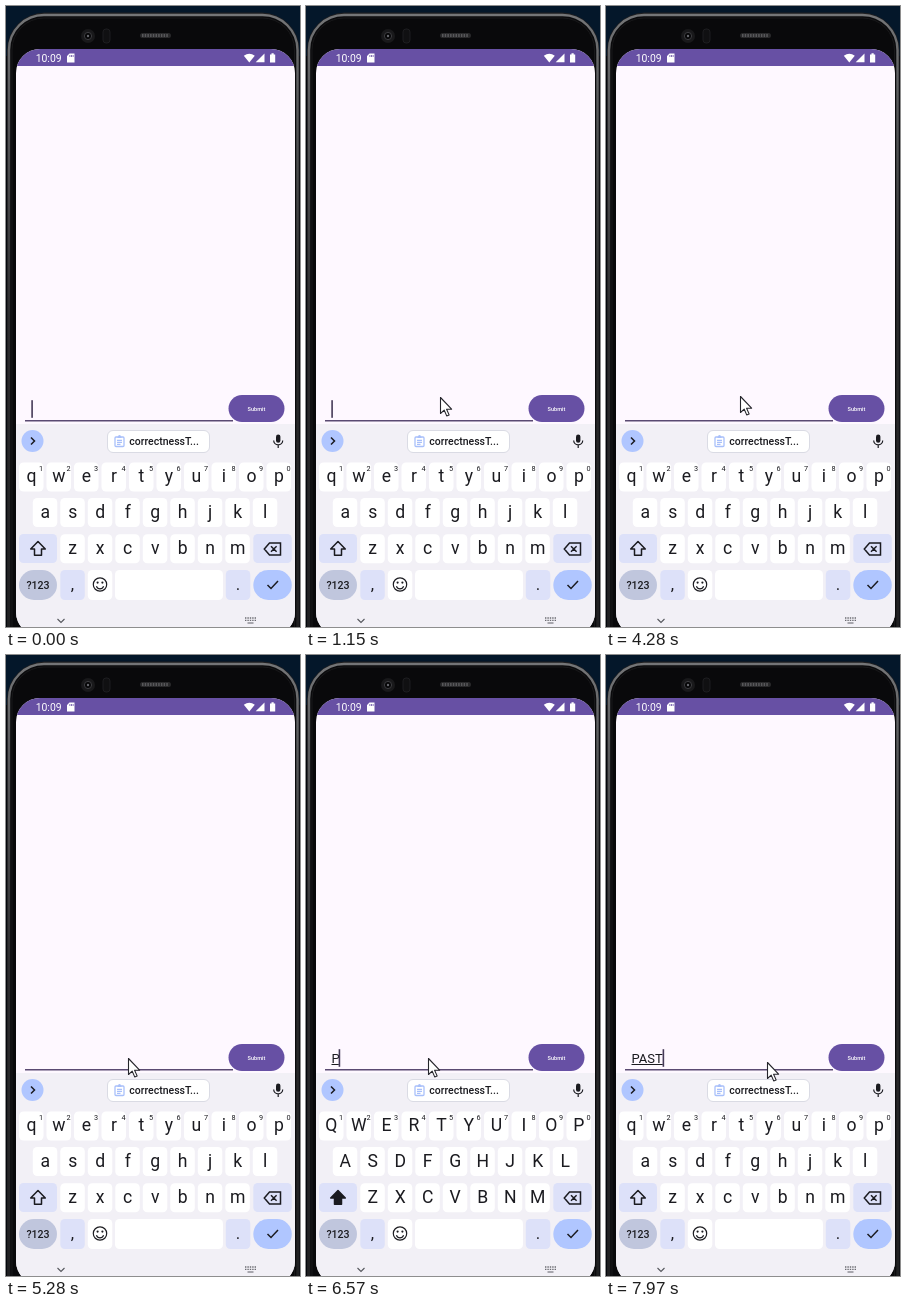
Animation, 294 px wide and 621 px high, one loop 8000 ms. Source, as an HTML page:

```html
<!DOCTYPE html>
<html lang="en">
<head>
<meta charset="utf-8">
<style>
  html, body { margin: 0; width: 100%; height: 100%; overflow: hidden; background: #04070c; }
  svg { display: block; width: 100%; height: 100%; }
  text { font-family: Roboto, sans-serif; fill: #1b1b20; }
  .mid { text-anchor: middle; }
  .line { fill: none; stroke: #1b1b20; stroke-width: 1.5; }
  .thin { stroke-width: 1.2; }
</style>
</head>
<body>
<svg id="stage" viewBox="0 0 294 621" preserveAspectRatio="none">
  <defs>
    <linearGradient id="rim" gradientUnits="userSpaceOnUse" x1="0" y1="0" x2="0" y2="621">
      <stop stop-color="#77787a"/><stop offset=".15" stop-color="#5a5b5d"/><stop offset=".5" stop-color="#2c2c2e"/><stop offset="1" stop-color="#202022"/>
    </linearGradient>
    <clipPath id="screen"><rect x="10" y="43" width="279" height="587" rx="24"/></clipPath>
  </defs>

  <!-- phone body -->
  <rect width="294" height="621" fill="#04070c"/>
  <rect width="294" height="50" fill="#04172a"/>
  <rect x="1" y="6.5" width="292.5" height="680" rx="38" fill="#1f1f21"/>
  <rect x="3" y="9" width="288.5" height="680" rx="35" fill="#0a0a0c" stroke="url(#rim)" stroke-width="2.4"/>
  <rect x="6" y="12" width="282.5" height="680" rx="32" fill="#09090b" stroke="#18181a"/>
  <circle cx="82" cy="30" r="7" fill="#19191b"/>
  <circle cx="82" cy="30" r="3.6" fill="#050506" stroke="#3c3c40"/>
  <circle cx="82" cy="30" r="1.2" fill="#66676d"/>
  <rect x="97" y="23" width="7" height="14" rx="3" fill="#101012" stroke="#1d1d20"/>
  <rect x="134" y="27" width="31" height="5" rx="2.5" fill="#29292b"/>
  <path d="M136 29.5H163" stroke="#58585b" stroke-width="3" stroke-dasharray="1.5 1.2"/>

  <g clip-path="url(#screen)">
    <rect x="10" y="43" width="279" height="578" fill="#fef8ff"/>
    <rect x="10" y="43" width="279" height="17" fill="#6750a4"/>
    <rect x="10" y="418" width="279" height="203" fill="#f2f0f6"/>
  </g>

  <!-- status bar -->
  <text x="29.7" y="56" font-size="10.4" style="fill:#fff">10:09</text>
  <g fill="#fff">
    <path d="M63.5 47.5H68.5V56.5H61V50ZM63.5 49v2h.8v-2Zm1.6 0v2h.8v-2Zm1.6 0v2h.8v-2Z" fill-rule="evenodd"/>
    <path d="M237.8 49.8Q243.3 45.8 248.8 49.8L243.3 56.6Z"/>
    <path d="M258.5 47.5V56.3H249.7Z"/>
    <path d="M264 48.4H265.5V47.3H267.7V48.4H269.2V56.5H264Z"/>
  </g>

  <!-- input row -->
  <rect x="19" y="414" width="208" height="1.5" fill="#5a4a72"/>
  <rect x="222.5" y="389" width="56" height="27" rx="13.5" fill="#6750a4"/>
  <text class="mid" x="250.5" y="404.6" font-size="5.6" font-weight="500" style="fill:#fff">Submit</text>
  <text id="typed" x="25.5" y="408" font-size="13">PAST</text>
  <rect id="underline" x="25.5" y="409" height="1" fill="#1b1b20"/>
  <rect id="caret" y="394.2" width="1.6" height="17.6" fill="#453a58"/>

  <!-- suggestion strip -->
  <circle cx="26.5" cy="435" r="11" fill="#b0c6ff"/>
  <path class="line" d="M25 431.5L28.5 435L25 438.5"/>
  <rect x="101.5" y="424.5" width="102" height="22" rx="5.5" fill="#fff" stroke="#dadbe4"/>
  <g fill="none" stroke="#a9c0fa" stroke-width="1.3">
    <rect x="109" y="431" width="9" height="9.5" rx="1"/>
    <path d="M111.5 431.3H115.5M111 434.3H116M111 436.3H116M111 438.3H114.5"/>
  </g>
  <circle cx="113.5" cy="430.4" r="1.5" fill="#a9c0fa"/>
  <text x="123.3" y="439" font-size="10.5" font-weight="500">correctnessT...</text>
  <rect x="270" y="428.5" width="4.4" height="8.2" rx="2.2" fill="#1b1b20"/>
  <path class="line thin" d="M267.7 434.5a4.5 4.3 0 0 0 9 0M272.2 439V442"/>

  <g id="keys"></g>

  <!-- key icons -->
  <path id="shift" class="line" stroke-linejoin="round" d="M32 535.5L39.3 543H35.5V549.3H28.5V543H24.7Z"/>
  <path class="line" d="M263.5 537H274.5V549H263.5L258.3 543ZM265 540.3L270.6 545.7M270.6 540.3L265 545.7"/>
  <circle class="line thin" cx="94" cy="578.5" r="6.7"/>
  <path class="line thin" d="M90.4 580.2Q91.4 582.8 94 582.8T97.6 580.2"/>
  <circle cx="91.6" cy="576.6" r="1.1" fill="#1b1b20"/>
  <circle cx="96.4" cy="576.6" r="1.1" fill="#1b1b20"/>
  <path class="line" d="M261.5 579L265 582.5L272 575"/>
  <path d="M51.5 613L55 616.5L58.5 613" fill="none" stroke="#55565c" stroke-width="1.1"/>
  <path d="M239 612H250M239 614.4H250" stroke="#6b6b72" stroke-width="1.3" stroke-dasharray="1.4 1"/>
  <path d="M241.5 617H247.5" stroke="#6b6b72" stroke-width="1.1"/>

  <path id="handle" d="M26 412.5L30.5 416A7 7 0 1 1 21.5 416Z" fill="#1b1b20"/>
  <path id="pointer" d="M.5 .5V16.5L4.2 13.1L6.7 18.9L9.1 17.9L6.6 12.2H11.6Z" fill="#fff" stroke="#25252b" stroke-width="1.1" stroke-linejoin="round"/>
</svg>

<script>
const LOOP = 8000;
const $ = id => document.getElementById(id);

// Keyboard
const WHITE = '#fff', TINT = '#dde1f9', PITCH = 27.5;
const key = (x, y, w, fill = WHITE, rx = 4.5, h = 29) =>
  `<rect x="${x}" y="${y}" width="${w}" height="${h}" rx="${rx}" fill="${fill}"/>`;
const label = (x, y, size, text, cls = '', weight = 400) =>
  `<text class="mid ${cls}" x="${x}" y="${y}" font-size="${size}" font-weight="${weight}">${text}</text>`;
const row = (letters, x, y) => [...letters].map((c, i) =>
  key(x + i * PITCH, y, 24.5) + label(x + 12.4 + i * PITCH, y + 19.6, 17.6, c, 'letter')).join('');

$('keys').innerHTML =
  row('qwertyuiop', 13, 456.5) + row('asdfghjkl', 26.8, 492) + row('zxcvbnm', 54.3, 528.2) +
  [...'1234567890'].map((n, i) => label(35 + i * PITCH, 465, 7.3, n)).join('') +
  key(13, 528, 38, TINT) + key(247.3, 528, 38.5, TINT) +
  key(13, 564, 38, '#c0c6dd', 15, 30) + key(54.3, 564, 24.5, TINT, 4.5, 30) +
  key(81.8, 564, 24.5, WHITE, 4.5, 30) + key(109, 564, 108, WHITE, 4.5, 30) +
  key(219.8, 564, 24.5, TINT, 4.5, 30) + key(247.3, 564, 38.5, '#b0c6ff', 15, 30) +
  label(32, 582.5, 10.6, '?123', '', 500) + label(66.5, 584, 17, ',') + label(232, 584, 17, '.');
const letters = [...document.querySelectorAll('.letter')];

// Timeline
const WORD = 'PAST', TEXT_X = 25.5;
const TYPED_AT = [6570, 6960, 7230, 7300];
const UNDERLINED_AT = [6570, 7230, 7300, 7560];
const CARET_ON = [[0, 260], [780, 1290], [1820, 2280], [2810, 3270], [3820, 4280],
                  [4810, 5210], [5410, 6290], [6570, LOOP]];
const MOVES = [ // start, end, from, to
  [460, 1150, [253, 558], [134, 391]],
  [1219, 1220, [134, 391], [134, 390]],
  [4780, 4950, [134, 390], [129, 396]],
  [5180, 5280, [129, 396], [122, 403]],
  [7860, 7970, [122, 403], [161, 407]],
];

const clamp = v => Math.max(0, Math.min(1, v));
const within = (t, [a, b]) => t >= a && t < b;
const countPassed = (times, t) => times.filter(at => t >= at).length;
const widths = [0, 1, 2, 3, 4].map(n => n && $('typed').getSubStringLength(0, n));

function pointerAt(t) {
  const [start, end, from, to] = MOVES.filter(m => t >= m[0]).pop();
  const p = clamp((t - start) / (end - start));
  const eased = 1 - (1 - p) ** 2;
  return from.map((v, i) => v + (to[i] - v) * eased);
}

let wasUpper = null;
function draw(t) {
  const count = countPassed(TYPED_AT, t);
  $('typed').textContent = WORD.slice(0, count);
  $('underline').setAttribute('width', widths[countPassed(UNDERLINED_AT, t)]);
  $('caret').setAttribute('x', TEXT_X + widths[count] - .2);
  $('caret').style.opacity = CARET_ON.some(span => within(t, span)) ? 1 : 0;

  $('handle').style.opacity = .32 * clamp((t - 5480) / 480) * (1 - clamp((t - 6270) / 150));

  $('pointer').style.display = t < 460 ? 'none' : '';
  if (t >= 460) $('pointer').setAttribute('transform', `translate(${pointerAt(t)})`);

  const upper = within(t, [6570, 6700]);
  if (upper !== wasUpper) {
    letters.forEach(el => el.textContent = upper ? el.textContent.toUpperCase() : el.textContent.toLowerCase());
    $('shift').style.fill = upper ? '#1b1b20' : 'none';
    wasUpper = upper;
  }
}

const began = performance.now();
function tick() {
  draw((performance.now() - began) % LOOP);
  requestAnimationFrame(tick);
}
tick();
</script>
</body>
</html>
```
